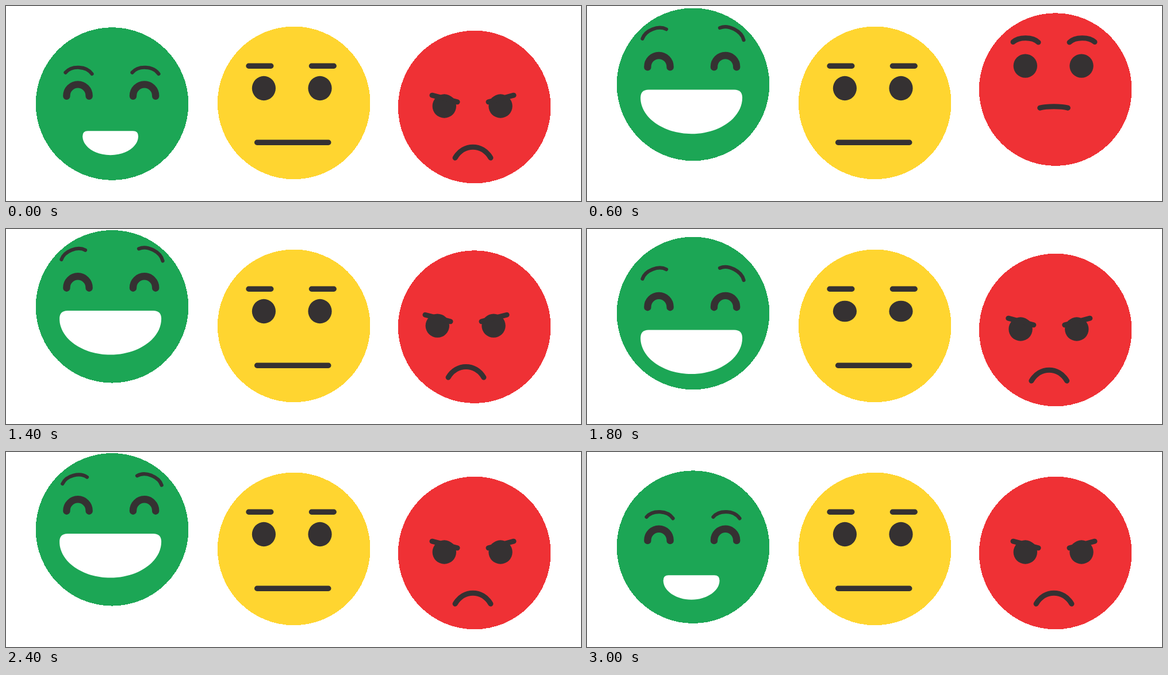
Write an HTML page that moves like this. It is 1000 px wide and 339 px high and loops after 3040 ms.

```html
<!DOCTYPE html>
<html lang="en">
<head>
<meta charset="utf-8">
<title>Three moods</title>
<style>
  html, body { margin: 0; width: 100%; height: 100%; overflow: hidden; background: #fff; }
  svg { display: block; width: 100%; height: 100%; }
  .head { shape-rendering: crispEdges; }
  .line { fill: none; stroke: #353132; stroke-linecap: round; stroke-linejoin: round; }
  .dot { fill: #353132; }
</style>
</head>
<body>
<svg viewBox="0 0 1000 339">
  <circle class="head" id="gHead" cx="184.5" r="132.8" fill="#1ca655"/>
  <g id="gFace">
    <path class="line" stroke-width="12.4" d="M105.4 26.8V26a19.6 19.6 0 0 1 39.2 0v.8M221 26.8V26a19.6 19.6 0 0 1 39.2 0v.8"/>
    <path class="line" id="gBrows" stroke-width="6.2"/>
    <path id="gMouth" fill="#fff"/>
  </g>

  <circle class="head" cx="500.7" cy="168.4" r="132.8" fill="#ffd530"/>
  <path class="line" stroke-width="9.4" d="M422 104.2h38.8M531.4 104.2h38.8M436.6 237.2h124.2"/>
  <ellipse class="dot" id="yLeft" cx="448.4" cy="143" rx="20.6"/>
  <ellipse class="dot" id="yRight" cx="546" cy="143" rx="20.6"/>

  <circle class="head" id="rHead" cx="814.7" r="132.8" fill="#ef3135"/>
  <g id="rFace">
    <circle class="dot" cx="762.3" r="20.7"/>
    <circle class="dot" cx="860" r="20.7"/>
    <path class="line" id="rLines" stroke-width="9"/>
  </g>
</svg>
<script>
const LOOP = 3040, STEP = 40;
const SIDES = [-1, 1];
const set = (id, name, value) => document.getElementById(id).setAttribute(name, value);
const mix = (a, b, k) => a + (b - a) * k;

// Progress from time a to b with chosen start and end slopes
const ease = (t, a, b, s = 0, e = 0) => {
  const u = Math.min(1, Math.max(0, (t - a) / (b - a)));
  return u * u * (3 - 2 * u) + s * u * (1 - u) ** 2 - e * u * u * (1 - u);
};

// Arched stroke: centre of its chord, half width, tilt of the right end, arch height
function bow(x, y, half, tilt, arch) {
  const lift = arch * 4 / 3, lean = lift * tilt / half;
  const at = (k, up) => `${x + k * half + up * lean} ${y + k * tilt - up * lift}`;
  return `M${at(-1, 0)}C${at(-0.55, 1)} ${at(0.55, 1)} ${at(1, 0)}`;
}

// Open mouth: flat top with rounded corners and a round chin
function grinPath(x, y, w, h, r) {
  const side = y + r, low = y + h, bend = mix(side, low, 0.55);
  return `M${x - w + r} ${y}H${x + w - r}Q${x + w} ${y} ${x + w} ${side}` +
    `C${x + w} ${bend} ${x + w * 0.55} ${low} ${x} ${low}` +
    `S${x - w} ${bend} ${x - w} ${side}Q${x - w} ${y} ${x - w + r} ${y}Z`;
}

// Three hops; the face moves further than the head and falls a little later
function drawGreen(t) {
  const hop = Math.max(0, Math.floor((t - 40) / 1000));
  const land = 1040 + hop * 1000, apex = land - 600;
  const rise = ease(t, hop && land - 1000, apex, 0.7);
  const high = rise - ease(t, apex, land, 0, 2.1);
  set("gHead", "cy", mix(170, 134, high));

  const rest = 130, deep = 142.5, top = 74.4;
  const y = t < apex
    ? mix(hop ? deep : rest, top, rise)
    : mix(top, hop < 2 ? deep : rest, ease(t, land - 540, land, 0, 0.5));
  set("gFace", "transform", `translate(0 ${y})`);

  const joy = ease(t, 0, 480) - ease(t, 2200, 2800);
  set("gBrows", "d", SIDES.map(s => bow(
    184.5 + s * mix(58, 67.3, joy), mix(-13.2, -31, joy),
    mix(23, 20.8, joy), 1.2 + s * 9.4 * joy, mix(10, 8.3, joy))).join(""));

  const grin = ease(t, 0, 480) - ease(t, 2440, 3040);
  set("gMouth", "d", grinPath(181.6, mix(87.2, 66, grin),
    mix(48.4, 88.5, grin), mix(42, 76.6, grin), mix(9, 14, grin)));
}

function drawYellow(t) {
  const shut = ease(t, 1760, 1920) - ease(t, 1920, 2080);
  for (const id of ["yLeft", "yRight"]) set(id, "ry", mix(21.2, 3, shut));
}

// Jumps up surprised, sinks back angry while shaking the face
function drawRed(t) {
  const calm = ease(t, 0, 480);
  const drop = 1 - ease(t, 0, 520) + ease(t, 520, 1720);
  set("rHead", "cy", mix(144.7, 175.5, drop));

  const x = 12 * (ease(t, 760, 1080) - 2 * ease(t, 1080, 1400)
    + 2 * ease(t, 1720, 2040) - ease(t, 2080, 2400));
  const y = mix(102.5, 174, 1 - calm + ease(t, 560, 1600, 0.5));
  set("rFace", "transform", `translate(${x} ${y})`);

  const anger = 1 - calm + ease(t, 520, 1440, 0.3);
  const brows = SIDES.map(s => bow(812 + s * 49, mix(-42.5, -13, anger),
    22, -s * 5.8 * anger, mix(7.5, 0, anger)));
  const mouth = bow(812, mix(72.3, 90, anger), mix(24, 30.9, anger), 0, mix(1.6, 18.7, anger));
  set("rLines", "d", brows.join("") + mouth);
}

function draw(now) {
  const t = Math.floor((now % LOOP) / STEP) * STEP;
  drawGreen(t);
  drawYellow(t);
  drawRed(t);
}

let start;
function tick(now) {
  start ??= now;
  draw(Math.max(0, now - start));
  requestAnimationFrame(tick);
}
draw(0);
requestAnimationFrame(tick);
</script>
</body>
</html>
```
